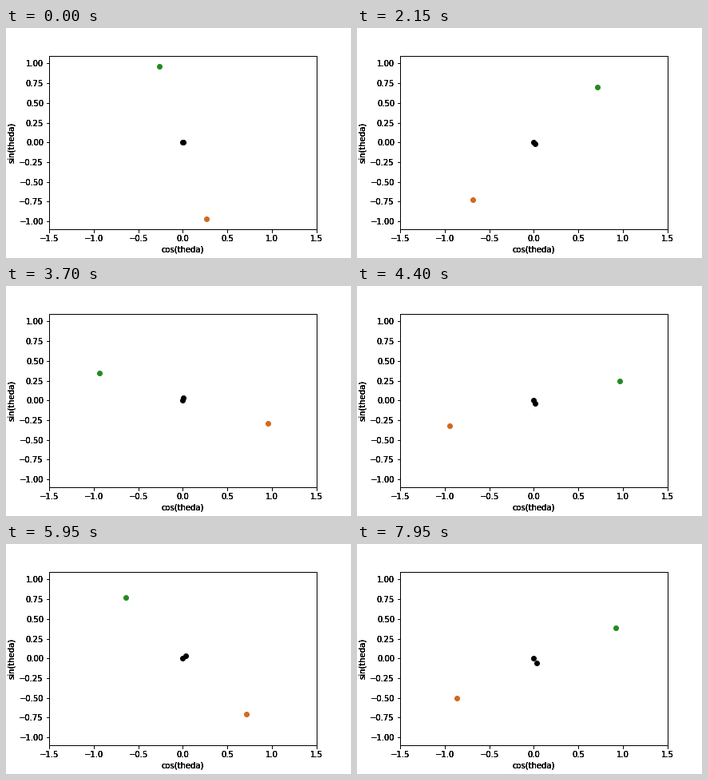
Write a matplotlib script that moves like this. It is 432 px wide and 288 px high and loops after 8 s.

```python
import numpy as np
import matplotlib.pyplot as plt
from matplotlib.animation import FuncAnimation

FRAMES, STEP_MS = 160, 50
# start angle and turn per frame, in degrees
GREEN = (105.3, 15.332)
ORANGE = (285.5, 15.376)
INK_PASSES = 4  # repeated drawing gives the heavy labels

plt.rcParams.update({
    "font.family": "DejaVu Sans",
    "font.size": 10,
    "figure.subplot.left": 0.125,
    "figure.subplot.right": 0.9,
    "figure.subplot.bottom": 0.125,
    "figure.subplot.top": 0.88,
})


def add_axes(fig):
    ax = fig.add_subplot()
    ax.patch.set_visible(False)
    ax.set(xlim=(-1.5, 1.5), ylim=(-1.1, 1.1),
           xlabel="cos(theda)", ylabel="sin(theda)")
    ax.set_xticks(np.arange(-1.5, 1.6, 0.5))
    ax.set_yticks(np.arange(-1, 1.1, 0.25))
    return ax


def on_circle(orbit, n):
    start, turn = orbit
    angle = np.radians(start + turn * n)
    return np.array([np.cos(angle), np.sin(angle)])


fig = plt.figure(figsize=(6, 4), dpi=72, facecolor="white")
ax = [add_axes(fig) for _ in range(INK_PASSES)][-1]

ax.plot(0, 0, "o", color="black")
middle, = ax.plot([], [], "o", color="black")
green, = ax.plot([], [], "o", color="forestgreen")
orange, = ax.plot([], [], "o", color="chocolate")


def update(n):
    a, b = on_circle(GREEN, n), on_circle(ORANGE, n)
    for dot, (x, y) in ((green, a), (orange, b), (middle, (a + b) / 2)):
        dot.set_data([x], [y])
    return green, orange, middle


anim = FuncAnimation(fig, update, frames=FRAMES, interval=STEP_MS,
                     repeat=True, repeat_delay=0)
plt.show()
```
